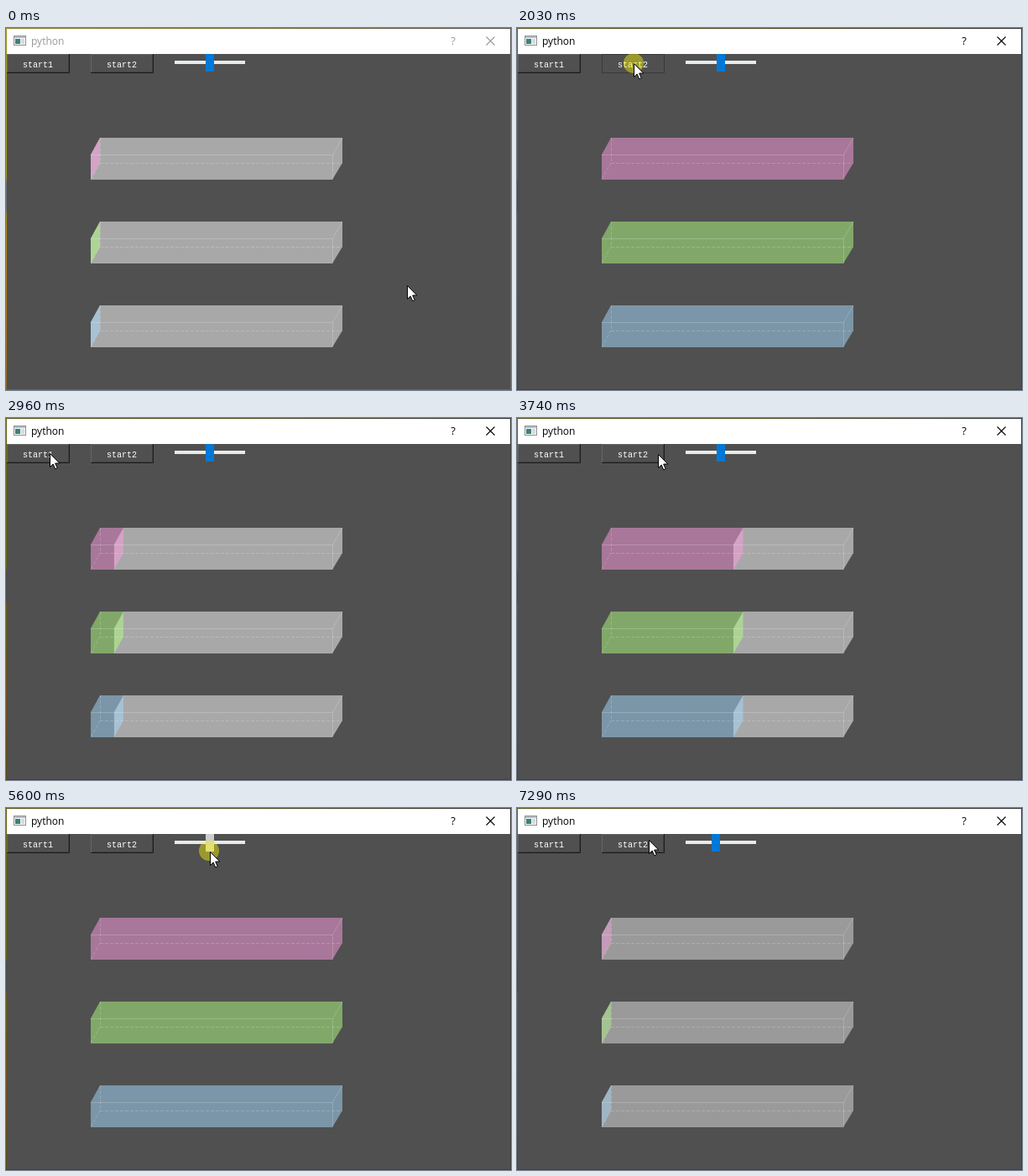
Recreate the animation shown at these times as an HTML page. Size 602 by 432 pixels, loop 7670 ms.

```html
<!DOCTYPE html>
<html lang="en">
<head>
<meta charset="utf-8">
<title>python</title>
<style>
  html, body { margin: 0; width: 100%; height: 100%; overflow: hidden; background: #505050; }
  svg { display: block; }
  .title { font: 12px "Open Sans", "Noto Sans", sans-serif; }
  .label { font: 10px "Liberation Mono", monospace; fill: #fff; }
  .edge { fill: none; stroke: #fff; stroke-opacity: .19; }
  .dash { stroke-dasharray: 4 2; }
</style>
</head>
<body>
<svg id="stage" width="602" height="432" viewBox="0 0 602 432">
  <defs>
    <linearGradient id="side" x1="0" y1="0" x2="0" y2="1">
      <stop offset="0" stop-color="#a29a20"/>
      <stop offset=".41" stop-color="#a29a20"/>
      <stop offset=".43" stop-color="#6c7078"/>
      <stop offset=".5" stop-color="#6c7078"/>
      <stop offset=".52" stop-color="#a89020"/>
      <stop offset=".8" stop-color="#b0761c"/>
      <stop offset="1" stop-color="#8a6a20"/>
    </linearGradient>
    <linearGradient id="top">
      <stop offset="0" stop-color="#8c8630"/>
      <stop offset=".5" stop-color="#77733a"/>
      <stop offset="1" stop-color="#555"/>
    </linearGradient>
  </defs>
  <rect width="602" height="432" fill="#505050"/>
  <rect x="1" y="1" width="600" height="30" fill="#fff"/>
  <rect width="602" height="1" fill="url(#top)"/>
  <rect width="1" height="432" fill="url(#side)"/>
  <path d="M601.5 1V431.5H1" fill="none" stroke="#606060"/>
  <path id="shade" d="M.5 432V.5H601.5V431.5H1" fill="none" stroke="#000" stroke-opacity=".35"/>

  <rect x="9.5" y="9.5" width="14" height="11" fill="#f4f6f6" stroke="#8c9296"/>
  <rect x="10" y="10" width="13" height="2" fill="#b9bfc3"/>
  <rect x="11" y="13" width="6" height="6" fill="#3a8278"/>
  <rect x="18" y="13" width="4" height="6" fill="#d5dadb"/>
  <g id="caption">
    <text class="title" x="30" y="20">python</text>
    <text class="title" x="533" y="20" text-anchor="middle" style="font-size:13px">?</text>
    <path d="M572.5 10.5L582.5 20.5M582.5 10.5L572.5 20.5" fill="none" stroke="currentColor" stroke-width="1.1"/>
  </g>

  <g id="buttons"></g>
  <rect x="201" y="39" width="84" height="4" fill="#e7eaea"/>
  <rect id="knob" y="31" width="10" height="21"/>
  <g id="bars"></g>
  <circle id="halo" r="12" fill="#fffa00" fill-opacity=".43"/>
  <path id="arrow" d="M.5 .5V16.5L4.2 13L6.7 18.8L9.2 17.7L6.7 12H11.8Z" fill="#fff" stroke="#000"/>
</svg>
<script>
const LOOP = 7670, FILL = 1000;
const $ = id => document.getElementById(id);

function add(parent, tag, attrs) {
  const el = document.createElementNS("http://www.w3.org/2000/svg", tag);
  for (const k in attrs) el.setAttribute(k, attrs[k]);
  parent.append(el);
  return el;
}

// time, x, y of the pointer
const path = [
  [0, 478, 307], [640, 58, 46], [705, 55, 42], [1250, 55, 42],
  [1570, 111, 43], [1870, 139, 42], [2180, 139, 42], [2720, 54, 42],
  [2800, 52, 42], [3250, 52, 42], [3500, 102, 42], [3990, 243, 44],
  [4040, 243, 46], [4270, 227, 49], [4510, 227, 49], [4580, 231, 50],
  [4885, 243, 52], [5590, 243, 52], [5735, 237, 50], [6050, 157, 38], [LOOP, 157, 38]
];
const presses = [
  { on: "start1", from: 705, to: 865 },
  { on: "start2", from: 2025, to: 2100 },
  { on: "start1", from: 3105, to: 3185 },
  { on: "slider", from: 4040, to: 5735 },
  { on: "start2", from: 6200, to: 6275 }
];

const clamp = v => Math.max(0, Math.min(1, v));
const ramp = (t, start) => clamp((t - start) / FILL);

// The screen refreshes in even ticks
function tick(t) {
  const [start, step] = t < 870 ? [-1, 71] : [870, 77.3];
  return Math.max(0, start + Math.floor((t - start) / step) * step);
}

function pointer(t) {
  const i = Math.max(1, path.findIndex(p => p[0] >= t));
  const [t0, x0, y0] = path[i - 1], [t1, x1, y1] = path[i];
  let u = clamp((t - t0) / (t1 - t0));
  if (i === 1) u = u * u * (3 - 2 * u);
  return [x0 + (x1 - x0) * u, y0 + (y1 - y0) * u];
}

function level(t) {
  if (t < 2054) return ramp(t, 803);
  if (t < 3185) return 1 - ramp(t, 2054);
  if (t < 6235) return ramp(t, 3185);
  return 1 - ramp(t, 6235);
}

function makeButton(name, x) {
  const g = add($("buttons"), "g", { transform: `translate(${x} 31)` });
  add(g, "rect", { width: 75, height: 23, fill: "#505050" });
  const raised = add(g, "g", { fill: "none" });
  add(raised, "path", { d: "M.5 22V.5H74", stroke: "#666" });
  add(raised, "path", { d: "M1 21.5H73.5V1", stroke: "#404040" });
  add(raised, "path", { d: "M0 22.5H74.5V0", stroke: "#1c1c1c" });
  const sunk = add(g, "rect", { x: .5, y: .5, width: 74, height: 22, fill: "none", stroke: "#3a3a3a" });
  add(g, "text", { class: "label", x: 19, y: 16 }).textContent = name;
  return down => {
    raised.style.display = down ? "none" : "";
    sunk.style.display = down ? "" : "none";
  };
}

function makeBar(y, color) {
  const g = add($("bars"), "g", { transform: `translate(101 ${y})` });
  const rest = add(g, "path", { fill: "#fff" });
  const body = add(g, "path", { fill: color });
  add(g, "path", { class: "edge", d: "M0 20.5H288.5V50M288.5 20L300 0" });
  add(g, "path", { class: "edge dash", d: "M11.5 0V30.5H300M11 30L0 50" });
  const hull = (a, b) => {
    const f0 = 288 * a, f1 = 288 * b, r0 = 11 + 289 * a, r1 = 11 + 289 * b;
    return `M${f0} 20L${r0} 0H${r1}V30L${f1} 50H${f0}Z`;
  };
  return (q, alpha) => {
    rest.setAttribute("d", q < 1 ? hull(q, 1) : "");
    body.setAttribute("d", hull(0, q));
    rest.setAttribute("fill-opacity", alpha);
    body.setAttribute("fill-opacity", alpha);
  };
}

const buttons = { start1: makeButton("start1", 1), start2: makeButton("start2", 101) };
const bars = [makeBar(131, "#ff9de4"), makeBar(231, "#b1ff82"), makeBar(331, "#a5dbff")];

function draw(now) {
  const t = tick(now % LOOP);
  const [x, y] = pointer(t).map(Math.round);
  const press = presses.find(p => t >= p.from && t < p.to);
  const held = press ? press.on : "";
  const active = t >= 705;

  $("caption").setAttribute("fill", active ? "#000" : "#999");
  $("caption").style.color = active ? "#000" : "#999";
  $("shade").style.display = active ? "" : "none";
  for (const name in buttons) buttons[name](held === name);

  const knob = held === "slider" ? x : t < 5000 ? 243 : 237;
  $("knob").setAttribute("x", knob - 5);
  $("knob").setAttribute("fill", held === "slider" ? "#ccc" : "#0078d7");
  const alpha = (knob - 206) / 74;
  for (const bar of bars) bar(level(t), alpha);

  $("halo").style.display = held ? "" : "none";
  $("halo").setAttribute("cx", held === "slider" ? x - 1 : x);
  $("halo").setAttribute("cy", held === "slider" ? y - 1 : y);
  $("arrow").setAttribute("transform", `translate(${x} ${y})`);
}

const begin = performance.now();
function frame() {
  draw(performance.now() - begin);
  requestAnimationFrame(frame);
}
frame();
</script>
</body>
</html>
```
